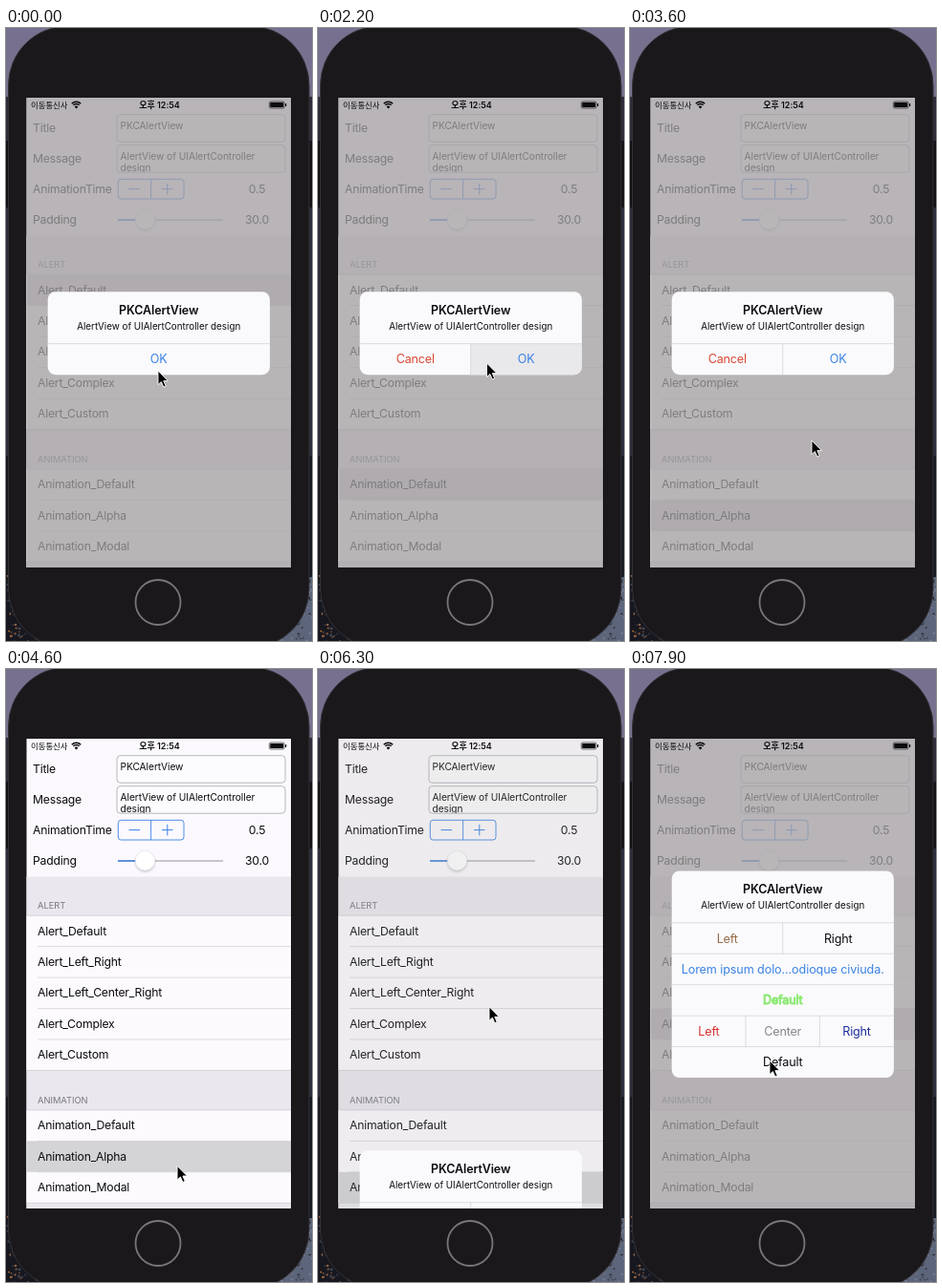
These frames come from a looping animation (320x642 px, 8 s). An HTML page:

```html
<!DOCTYPE html>
<html lang="ko">
<head>
<meta charset="utf-8">
<style>
  html, body { margin: 0; width: 100%; height: 100%; overflow: hidden; background: #17171c; }
  svg { display: block; width: 320px; height: 642px; }
  text { font-family: Inter, "Noto Sans CJK KR", "Noto Sans CJK", sans-serif; white-space: pre; }
</style>
</head>
<body>
<svg id="stage" viewBox="0 0 320 642" xmlns="http://www.w3.org/2000/svg"></svg>
<script>
const LOOP = 8000, BLUE = '#3a82e4', RED = '#dc4734', INK = '#0c0b0d';

const rect = (x, y, w, h, fill, more = '') =>
  `<rect x="${x}" y="${y}" width="${w}" height="${h}" fill="${fill}" ${more}/>`;
const line = (x1, y1, x2, y2, color, width = 0.7) =>
  `<path d="M${x1} ${y1}L${x2} ${y2}" stroke="${color}" stroke-width="${width}"/>`;
const text = (x, y, str, { size = 12.2, fill = INK, gap = -0.2, weight = 400, anchor = 'start', more = '' } = {}) =>
  `<text x="${x}" y="${y}" font-size="${size}" fill="${fill}" letter-spacing="${gap}" font-weight="${weight}" text-anchor="${anchor}" ${more}>${str}</text>`;

// Desktop wallpaper showing around the phone
function wallpaper() {
  let seed = 7;
  const rnd = () => (seed = seed * 16807 % 2147483647) / 2147483647;
  let out = rect(0, 0, 320, 72, '#77718f') + rect(0, 72, 320, 46, '#2e2c38')
    + rect(0, 118, 320, 70, '#121116') + rect(0, 188, 320, 260, '#2b2d3a')
    + rect(0, 448, 320, 194, '#17181f') + rect(280, 575, 40, 67, '#5c6579');
  for (let i = 0; i < 240; i++) {
    const left = i % 2, y = 642 - 72 * rnd(), x = left ? rnd() * 40 : 280 + rnd() * 40;
    const tone = left ? ['#9a6440', '#6b4833', '#3c4250'] : ['#22242c', '#454c5e', '#727a90'];
    out += rect(x, y, 1 + rnd() * 2, 1 + rnd() * 1.5, tone[i % 3]);
  }
  return out;
}

const phone = () =>
  rect(2.5, -2, 314.5, 651, '#1a181b', 'rx="62" stroke="#333136" stroke-width="1"')
  + '<circle cx="159" cy="601.5" r="23.5" fill="none" stroke="#77767a" stroke-width="1.8"/>';

function form() {
  const small = { size: 10.2, gap: -0.05 };
  const box = y => rect(116, y, 176, 28.5, '#fcfbfd', 'rx="3.5" stroke="#a9a8ad" stroke-width=".8"');
  return text(28, 109.3, 'Title') + text(28, 141.3, 'Message')
    + text(28, 173.2, 'AnimationTime') + text(28, 205, 'Padding')
    + box(90.7) + text(119.5, 106, 'PKCAlertView', small)
    + box(122.7) + text(119.5, 138, 'AlertView of UIAlertController', small)
    + `<g clip-path="url(#message)">${text(119.5, 150.4, 'design', small)}</g>`
    + rect(117.3, 158.3, 68.7, 20.7, 'none', `rx="3" stroke="${BLUE}" stroke-width=".9"`)
    + line(151.6, 158.3, 151.6, 179, BLUE, 0.9) + line(128.5, 168.6, 140, 168.6, BLUE, 1)
    + line(163, 168.6, 174.5, 168.6, BLUE, 1) + line(168.8, 162.8, 168.8, 174.4, BLUE, 1)
    + text(262.5, 173, '0.5', { anchor: 'middle' }) + text(262.5, 205, '30.0', { anchor: 'middle' })
    + line(117, 201, 227, 201, '#b6b5ba', 1.5) + line(117, 201, 145, 201, BLUE, 1.5)
    + '<circle cx="145.5" cy="202.3" r="10.6" fill="#000" opacity=".16" filter="url(#soft)"/>'
    + '<circle cx="145.5" cy="200.7" r="10.3" fill="#fff" stroke="#d5d4d8" stroke-width=".4"/>';
}

const ROW = 32.45;
const sections = [
  { top: 258.2, name: 'ALERT', rows: ['Default', 'Left_Right', 'Left_Center_Right', 'Complex', 'Custom'], prefix: 'Alert_' },
  { top: 461.9, name: 'ANIMATION', rows: ['Default', 'Alpha', 'Modal'], prefix: 'Animation_' }
];
const table = () => rect(21, 217.5, 278, 348, '#eae8ee')
  + sections.map(({ top, name, rows }) => {
    const end = top + rows.length * ROW;
    return rect(21, top, 278, end - top, '#fcfafd')
      + text(33, top - 7.4, name, { size: 9.3, fill: '#78777d', gap: 0 })
      + line(21, top, 299, top, '#c9c8cd') + line(21, end, 299, end, '#c9c8cd')
      + rows.slice(1).map((_, i) => line(33, top + (i + 1) * ROW, 299, top + (i + 1) * ROW, '#cfced3')).join('');
  }).join('')
  + rect(21, 0, 278, ROW, '#d4d3d6', 'id="selected"')
  + sections.map(({ top, rows, prefix }) =>
    rows.map((r, i) => text(33, top + i * ROW + 20.3, prefix + r)).join('')).join('');

const statusBar = () =>
  text(26, 84, '이동통신사', { size: 8.4, gap: 0, weight: 500 })
  + `<path d="M73.5 84.4l-1.9-1.9a2.7 2.7 0 0 1 3.8 0z" fill="${INK}"/>`
  + [4.4, 6.6].map(r =>
    `<path d="M${73.5 - r * 0.72} ${84 - r * 0.72}A${r} ${r} 0 0 1 ${73.5 + r * 0.72} ${84 - r * 0.72}" fill="none" stroke="${INK}" stroke-width="1.5"/>`).join('')
  + text(160.5, 84, '오후 12:54', { size: 9, gap: 0, weight: 600, anchor: 'middle' })
  + rect(275.3, 77, 15.8, 7, 'none', `rx="1.6" stroke="${INK}" stroke-width=".6"`)
  + rect(276.2, 77.9, 14, 5.2, INK, 'rx=".8"') + rect(292, 79, 1.2, 3, INK, 'rx=".6"');

// rows: lists of [label, colour, extra text options]
function alertBox(id, rows) {
  const h = 54.4 + rows.length * ROW, top = 319.7 - h / 2;
  const mid = { anchor: 'middle' };
  let out = rect(43.7, top, 232.2, h, '#fafafc', 'rx="8"')
    + `<path id="${id}-press" d="M160 ${top + h - ROW}H275.9V${top + h - 8}a8 8 0 0 1-8 8H160z" fill="#e9e8eb" visibility="hidden"/>`
    + text(159.7, top + 23.7, 'PKCAlertView', { ...mid, size: 12.5, weight: 600, gap: -0.12 })
    + text(159.7, top + 39.9, 'AlertView of UIAlertController design', { ...mid, size: 9.8, gap: 0.01 });
  rows.forEach((cells, i) => {
    const y = top + 54.4 + i * ROW, w = 232 / cells.length;
    out += line(43.7, y, 275.9, y, '#cfced3');
    cells.forEach(([label, fill, opts], k) => {
      out += text(43.7 + w * (k + 0.5), y + 20.8, label, { ...mid, size: 12.6, fill, ...opts });
      if (k) out += line(43.7 + w * k, y, 43.7 + w * k, y + ROW, '#cfced3');
    });
  });
  return `<g id="${id}">${out}</g>`;
}

const $ = id => document.getElementById(id);
$('stage').innerHTML = `
  <defs>
    <clipPath id="screen"><rect x="21.5" y="73" width="276.5" height="492"/></clipPath>
    <clipPath id="message"><rect x="116" y="123" width="176" height="28"/></clipPath>
    <filter id="soft"><feGaussianBlur stdDeviation="1.3"/></filter>
  </defs>
  ${wallpaper()}${phone()}
  <g clip-path="url(#screen)">
    ${rect(21, 73, 278, 493, '#fbf9fd')}${form()}${table()}
    ${rect(21, 73, 278, 493, '#a3a0a2', 'id="dim"')}${statusBar()}
    ${alertBox('single', [[['OK', BLUE]]])}
    ${alertBox('pair', [[['Cancel', RED], ['OK', BLUE]]])}
    ${alertBox('complex', [
      [['Left', '#946b48'], ['Right', INK]],
      [['Lorem ipsum dolo...odioque civiuda.', BLUE, { gap: -0.1 }]],
      [['Default', '#a4ee8e', { more: 'stroke="#86e86c" stroke-width=".9"' }]],
      [['Left', '#d8302c'], ['Center', '#86858a'], ['Right', '#1c2f9c']],
      [['Default', INK]]
    ])}
  </g>
  <path id="cursor" d="M0 0V14.6L3.4 11.5 5.8 17 8.2 16 5.8 10.6H10.4Z" fill="#000" stroke="#fff" stroke-width=".9"/>`;

// Each showing: alert, start of rise, start of fall, slide distance
const shows = [
  { id: 'single', from: -900, to: 250 },
  { id: 'pair', from: 1400, to: 2300 },
  { id: 'pair', from: 3020, to: 4100 },
  { id: 'pair', from: 4917, to: 5950, slide: 290 },
  { id: 'complex', from: 7110, to: 9000 }
];
const picks = [[0, 258.2], [1300, 461.9], [2950, 461.9 + ROW], [4850, 461.9 + 2 * ROW], [7000, 258.2 + 3 * ROW]];
const presses = [[2130, 2330], [4000, 4150], [5800, 5980]];
const path = [
  [0, 159, 359], [300, 159, 359], [800, 141, 458], [1150, 136, 475], [1450, 136, 475],
  [2000, 176.5, 351], [2350, 176.5, 351], [2850, 168, 507], [3150, 168, 507], [3600, 190, 432],
  [3950, 206, 348], [4200, 206, 348], [4700, 176, 540], [4980, 176, 540], [5400, 218, 280],
  [5720, 214, 346], [6000, 214, 346], [6800, 104, 370], [7250, 104, 370], [7700, 146, 414],
  [7900, 146, 410], [8000, 146, 410]
];

const ease = u => { u = Math.min(1, Math.max(0, u)); return u * u * (3 - 2 * u); };

function draw() {
  const t = performance.now() % LOOP;
  let dim = 0;
  for (const id of ['single', 'pair', 'complex']) $(id).setAttribute('opacity', 0);
  for (const { id, from, to, slide } of shows) {
    const level = ease((t - from) / 500) - ease((t - to) / 500);
    if (level <= 0) continue;
    dim = level;
    $(id).setAttribute('opacity', slide ? 1 : level);
    $(id).setAttribute('transform', `translate(0 ${(slide || 0) * (1 - level)})`);
  }
  $('dim').setAttribute('opacity', 0.76 * dim);
  $('selected').setAttribute('y', picks.filter(p => p[0] <= t).pop()[1]);
  $('pair-press').setAttribute('visibility', presses.some(([a, b]) => t >= a && t < b) ? 'visible' : 'hidden');

  const i = path.findIndex(p => p[0] > t), [t0, x0, y0] = path[i - 1], [t1, x1, y1] = path[i];
  const u = ease((t - t0) / (t1 - t0));
  $('cursor').setAttribute('transform', `translate(${x0 + (x1 - x0) * u} ${y0 + (y1 - y0) * u})`);
  requestAnimationFrame(draw);
}
draw();
</script>
</body>
</html>
```
